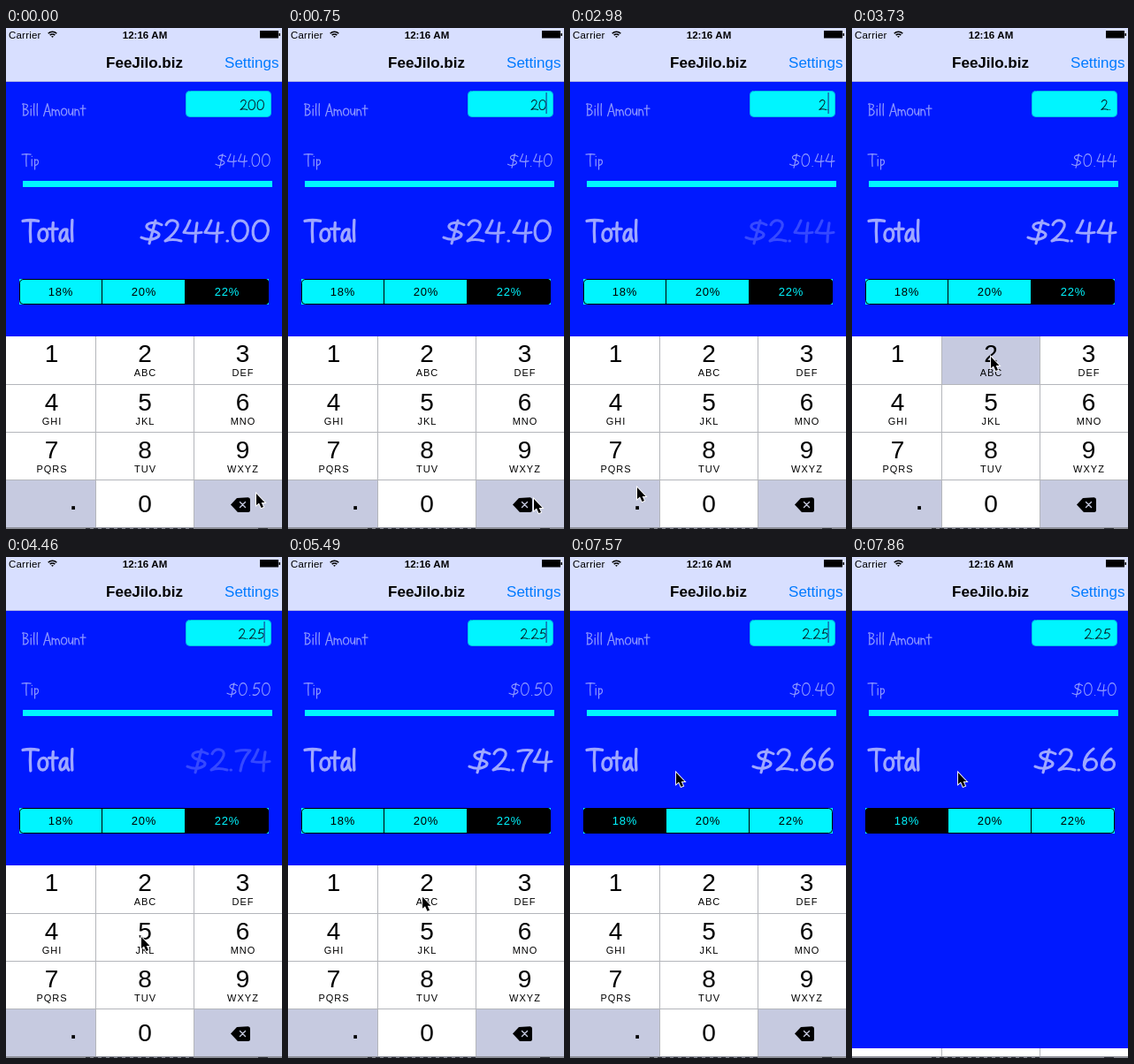
An HTML page with a canvas that plays this animation: 312x567 px, repeating every 8 s.

```html
<!DOCTYPE html>
<html lang="en">
<head>
<meta charset="utf-8">
<title>Tip calculator</title>
<style>
html, body { margin: 0; width: 100%; height: 100%; overflow: hidden; background: #0019ff; }
canvas { display: block; width: 312px; height: 567px; }
</style>
</head>
<body>
<canvas id="stage" width="312" height="567"></canvas>
<script>
const c = document.getElementById('stage').getContext('2d');
const LOOP = 8000, TICK = 148.2;
const SANS = '"Liberation Sans", Arial, sans-serif';
const BLUE = '#0019ff', CYAN = '#00f5ff', BAR = '#d8dfff', KEY = '#c6cae0', LINE = '#b4b6bb';

// Handwritten stroke lettering: advance and path, 26 units tall
const DIGITS = {
  0: [23, 'M11 1C0 1-1 25 9 25C22 25 23 1 11 1'],
  2: [21, 'M3 6C7-2 18 0 16 8C14 15 7 21 2 25Q10 22 20 25'],
  4: [24, 'M9 1Q6 9 2 15Q12 17 22 15M17 4Q15 15 15 26'],
  5: [22, 'M19 1L8 2L5 12C14 8 20 13 17 19Q12 27 3 24'],
  6: [20, 'M13 0C2 8-2 25 8 25C19 25 19 12 10 12Q4 13 3 19'],
  7: [18, 'M2 3Q10 1 18 2Q9 12 7 26'],
  8: [22, 'M17 4C8-3 2 6 9 11C22 18 16 25 9 25C0 24 3 16 11 12Q18 8 17 4'],
  $: [26, 'M24 6C14 0 2 6 9 11C15 14 24 15 20 20Q12 26 1 21M17 1L10 28'],
  '.': [7, 'M3 25h.5']
};
const LETTERS = {
  A: [15, 'M1 26L8 1L14 26M4 17H12'],
  B: [14, 'M3 1V25M1 2C16 0 11 12 3 12C17 13 13 25 2 25'],
  T: [17, 'M0 2Q9 0 18 2M9 2Q8 14 9 26'],
  a: [13, 'M10 12C3 9-1 24 4 25Q9 24 10 12Q9 22 12 25'],
  i: [6, 'M3 12V25M3 6h.3'],
  l: [6, 'M3 1Q2 13 3 25'],
  m: [18, 'M2 12V25M2 16Q8 8 9 25M9 16Q14 8 16 25'],
  n: [12, 'M2 12V25M2 16Q9 7 10 25'],
  o: [13, 'M7 11C0 11-1 25 6 25C13 25 13 11 7 11'],
  p: [13, 'M3 12V32M3 14C10 8 14 22 4 24'],
  t: [11, 'M5 4Q4 17 5 25M0 11H10'],
  u: [12, 'M2 12C1 28 9 27 10 12V25'],
  ' ': [8, '']
};
const glyphs = {};
for (const [ch, [adv, d]] of Object.entries({ ...DIGITS, ...LETTERS })) {
  glyphs[ch] = { adv, path: new Path2D(d) };
}

// Each edit: time, bill text, pressed key column and row
const EDITS = [
  [-650, '200'],
  [504, '20', 2, 3],
  [1691, '2', 2, 3],
  [2878, '2.', 0, 3],
  [3768, '2.2', 1, 0],
  [4362, '2.25', 1, 1]
];
// Each pick: time, tip percentage
const PICKS = [[-650, 22], [5994, 20], [7033, 18]];
const RATES = [18, 20, 22];
const DISMISS = 7610;

// Pointer stops: time, x, y
const POINTER = [
  [0, 283, 527], [148, 278, 533], [1930, 278, 533], [2500, 68, 524],
  [2690, 68, 524], [2820, 76, 520], [3000, 76, 520], [3660, 157, 372],
  [3960, 157, 372], [4260, 153, 430], [5250, 153, 430], [5860, 150, 292],
  [6450, 150, 292], [6850, 62, 296], [7130, 62, 296], [7500, 120, 244], [8000, 120, 244]
];

const COLS = [0, 102, 213, 313], ROWS = [349, 404, 458, 512, 566];
const KEYS = ['1', '2 ABC', '3 DEF', '4 GHI', '5 JKL', '6 MNO', '7 PQRS', '8 TUV', '9 WXYZ'];

const clamp = v => Math.max(0, Math.min(1, v));
const last = (list, t) => list.filter(e => e[0] <= t).pop();
const white = a => `rgba(255,255,255,${a})`;

function rect(x, y, w, h, fill) {
  c.fillStyle = fill;
  c.fillRect(x, y, w, h);
}

function text(str, x, y, font, fill = '#000', align = 'center', spacing = 0) {
  c.font = font + ' ' + SANS;
  c.fillStyle = fill;
  c.textAlign = align;
  c.letterSpacing = spacing + 'px';
  c.fillText(str, x + (align === 'center' ? spacing / 2 : 0), y);
  c.letterSpacing = '0px';
}

function hand(str, x, y, sx, sy, weight, color, right) {
  const chars = [...str];
  if (right) x -= sx * chars.reduce((sum, ch) => sum + glyphs[ch].adv, 0);
  c.strokeStyle = color;
  c.lineWidth = weight / sy;
  c.lineCap = c.lineJoin = 'round';
  for (const ch of chars) {
    c.save();
    c.translate(x, y);
    c.scale(sx, sy);
    c.stroke(glyphs[ch].path);
    c.restore();
    x += glyphs[ch].adv * sx;
  }
}

// Currency with halves rounded to the even cent
function money(v) {
  const cents = Math.round(v * 1e6) / 1e4;
  let n = Math.round(cents);
  if (cents % 1 === 0.5 && n % 2) n--;
  return '$' + (n / 100).toFixed(2);
}

function header() {
  rect(0, 0, 312, 61, BAR);
  rect(0, 60.5, 312, 0.5, '#8088c8');
  text('Carrier', 3, 12, '11.5px', '#000', 'left', 0.2);
  text('12:16 AM', 157, 12, 'bold 11.5px');
  c.strokeStyle = '#000';
  c.lineCap = 'butt';
  c.lineWidth = 1.6;
  for (const r of [1.2, 4, 6.8]) {
    c.beginPath();
    c.arc(52.5, 11, r, -Math.PI * 0.75, -Math.PI * 0.25);
    c.stroke();
  }
  rect(287, 3, 21, 8.5, '#000');
  rect(308.5, 6, 1.5, 3, '#000');
  text('FeeJilo.biz', 156.5, 45, 'bold 17px');
  text('Settings', 308.5, 45, '17px', '#007aff', 'right');
}

function caretAlpha(p) {
  p %= 1000;
  if (p < 500) return 1;
  return p < 960 ? clamp((650 - p) / 150) : (p - 960) / 40;
}

function form(t) {
  const [editTime, bill] = last(EDITS, t);
  const [pickTime, rate] = last(PICKS, t);
  const amount = parseFloat(bill), tip = amount * rate / 100;
  const fade = clamp((t - Math.max(editTime, pickTime)) / 250);

  hand('Bill Amount', 18, 85, 0.6, 0.56, 1.2, white(0.55));
  c.fillStyle = CYAN;
  c.beginPath();
  c.roundRect(203, 71, 97, 30, 5);
  c.fill();
  c.strokeStyle = 'rgba(0,40,160,0.25)';
  c.lineWidth = 1;
  c.beginPath();
  c.roundRect(203.5, 71.5, 96, 29, 4.5);
  c.stroke();
  hand(bill, 293, 81, 0.43, 0.46, 1.1, '#06222a', true);
  if (t < DISMISS) {
    c.globalAlpha = caretAlpha(t - editTime);
    rect(291.4, 73, 1.4, 24, '#1560a8');
    c.globalAlpha = 1;
  }

  hand('Tip', 18, 142, 0.56, 0.56, 1.2, white(0.55));
  hand(money(tip), 300, 142, 0.5, 0.58, 1.2, white(0.58), true);
  rect(19, 173, 282, 7, CYAN);
  hand('Total', 19, 216.5, 0.98, 0.98, 3.3, white(0.62));
  hand(money(amount + tip), 300, 217, 1, 0.96, 3, white(0.62 * fade), true);
  segments(rate);
}

function segments(rate) {
  rect(15, 284, 282, 29, CYAN);
  c.save();
  c.beginPath();
  c.roundRect(15, 284, 282, 29, 4);
  c.clip();
  RATES.forEach((r, i) => {
    const on = r === rate, x = 15 + i * 94;
    if (on) rect(x, 284, 94, 29, '#000');
    if (i) rect(x - 1, 284, 1, 29, '#000');
    text(r + '%', x + 46.5, 303, '13px', on ? CYAN : '#000', 'center', 0.7);
  });
  c.restore();
  c.strokeStyle = '#000';
  c.lineWidth = 1;
  c.beginPath();
  c.roundRect(15.5, 284.5, 281, 28, 4);
  c.stroke();
}

function eraseIcon(x, y) {
  c.fillStyle = '#000';
  c.beginPath();
  c.moveTo(x, y + 8.5);
  c.lineTo(x + 7, y + 1);
  c.arcTo(x + 22, y, x + 22, y + 8, 2.5);
  c.arcTo(x + 22, y + 17, x + 14, y + 17, 2.5);
  c.lineTo(x + 8, y + 17);
  c.closePath();
  c.fill();
  c.strokeStyle = KEY;
  c.lineWidth = 1.4;
  c.beginPath();
  for (const s of [-1, 1]) {
    c.moveTo(x + 10.5, y + 8.5 - 3 * s);
    c.lineTo(x + 16.5, y + 8.5 + 3 * s);
  }
  c.stroke();
}

function keyboard(t) {
  const drop = t < DISMISS ? 0 : 217 * (1 - Math.exp((DISMISS - t) / 80));
  c.save();
  c.translate(0, Math.round(drop));
  rect(0, 349, 312, 217, '#fff');
  rect(0, 512, 101, 54, KEY);
  rect(213, 512, 99, 54, KEY);

  const press = EDITS.find(e => e[0] - 100 <= t && t < e[0] - 5 && e.length > 2);
  if (press) {
    const [, , col, row] = press;
    const x = col || row < 3 ? COLS[col] : 49;
    const fill = row === 3 ? '#fff' : KEY;
    rect(x, ROWS[row], COLS[col + 1] - x - 1, ROWS[row + 1] - ROWS[row] - 1, fill);
  }

  for (const x of [101, 212]) rect(x, 349, 1, 217, LINE);
  for (const y of [403, 457, 511]) rect(0, y, 312, 1, LINE);
  KEYS.forEach((key, i) => {
    const [digit, letters] = key.split(' ');
    const x = [51.5, 157, 267.5][i % 3], y = ROWS[Math.floor(i / 3)];
    text(digit, x, y + 29, '28px');
    if (letters) text(letters, x, y + 45, '11px', '#000', 'center', 1);
  });
  text('0', 157, 548, '28px');
  text('.', 76, 545, 'bold 26px');
  eraseIcon(254, 531);
  c.restore();
}

function bottomEdge() {
  rect(0, 565, 312, 2, '#8d8f98');
  for (let x = 90; x < 212; x += 9) rect(x, 566, 5, 1, '#33353c');
  rect(285, 566, 11, 1, '#33353c');
}

function pointer(t) {
  const i = POINTER.findIndex(p => p[0] > t);
  const [t0, x0, y0] = POINTER[i - 1], [t1, x1, y1] = POINTER[i];
  let k = (t - t0) / (t1 - t0);
  k = k * k * (3 - 2 * k);
  c.save();
  c.translate(x0 + (x1 - x0) * k, y0 + (y1 - y0) * k);
  const arrow = new Path2D('M0 0V13L3 10.5L5.5 16L8 15L5.7 10H9.5Z');
  c.lineJoin = 'miter';
  c.lineWidth = 1.8;
  c.strokeStyle = '#fff';
  c.stroke(arrow);
  c.fillStyle = '#000';
  c.fill(arrow);
  c.restore();
}

function draw(now) {
  const t = Math.floor(now % LOOP / TICK) * TICK;
  rect(0, 0, 312, 567, BLUE);
  header();
  form(t);
  keyboard(t);
  bottomEdge();
  pointer(t);
}

const start = performance.now();
function loop() {
  draw(performance.now() - start);
  requestAnimationFrame(loop);
}
loop();
</script>
</body>
</html>
```
